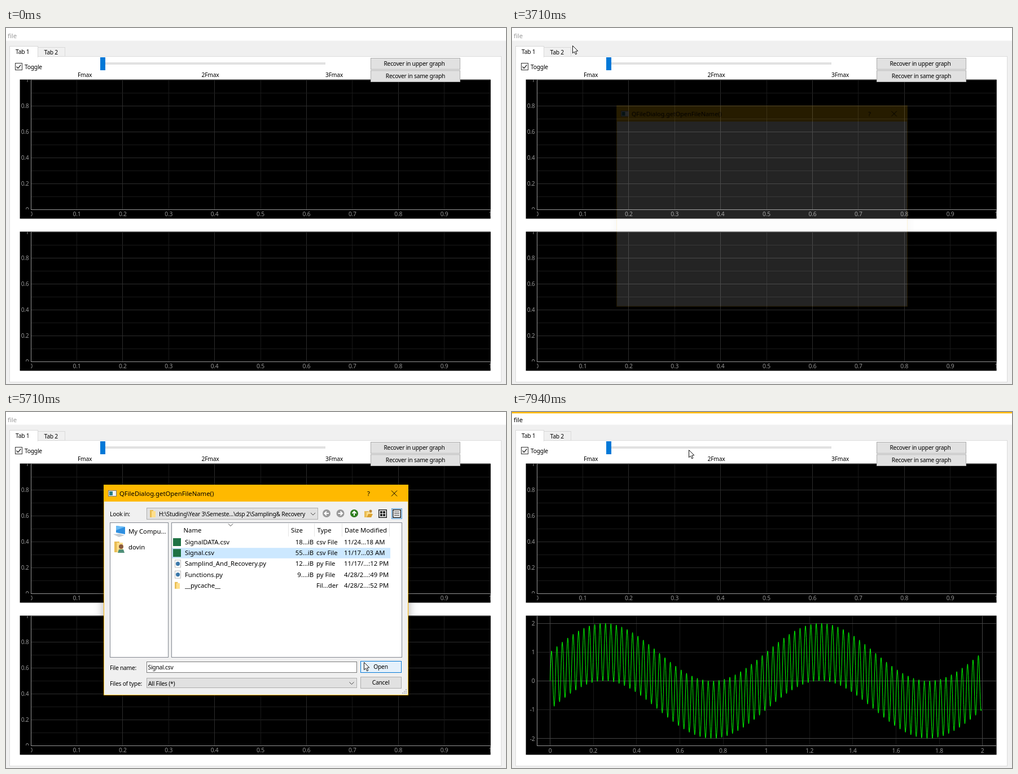
An HTML page with a canvas that plays this animation: 886x632 px, repeating every 8 s.

```html
<!DOCTYPE html>
<html lang="en">
<head>
<meta charset="utf-8">
<title>Sampling window</title>
<style>
html, body { margin: 0; width: 100%; height: 100%; overflow: hidden; background: #f0f0f0; }
canvas { display: block; }
</style>
</head>
<body>
<canvas id="stage" width="886" height="632"></canvas>
<script>
const W = 886, H = 632, LOOP = 8000, TICK = 77, START = 460;
const stage = document.getElementById('stage').getContext('2d');
const layer = document.createElement('canvas');
layer.width = W; layer.height = H;
const sheet = layer.getContext('2d');
let c = stage;

const BLUE = '#0078d7', AMBER = '#ffb900', BTN = '#e1e1e1', EDGE = '#adadad';
const SMALL = ['10.3px "Noto Sans", "Open Sans", sans-serif', '-0.24px'];
const UI = ['11.3px "Noto Sans", "Open Sans", sans-serif', '0px'];

const AT = {
  hover: 1380, menu: 1760, item: 2220, submenu: 2520, subitem: 3210, chosen: 3610,
  filled: 3760, picked: 4690, pressed: 5840, loaded: 6150, gone: 6380
};

// pointer strokes: begin, end, where to
const STROKES = [
  [460, 690, 85, 240], [770, 1070, 30, 59], [1070, 1460, 15, 2], [2000, 2300, 34, 32],
  [3080, 3610, 107, 31], [3850, 4230, 356, 215], [4290, 4690, 340, 247],
  [5020, 5690, 634, 444], [5840, 5930, 640.5, 449], [7100, 7560, 234, 34],
  [7560, 7700, 336, 52], [7860, 7920, 313, 67]
];

const clamp = v => Math.max(0, Math.min(1, v));
const ease = v => v * v * (3 - 2 * v);

// the screen only refreshes on regular ticks
const held = t => START + Math.floor((t - START) / TICK + .2) * TICK;

function pointerAt(t) {
  if (t < START || (t > 760 && t < 1070)) return null;
  let x = 654, y = 511;
  for (const [a, b, u, v] of STROKES) {
    const k = ease(clamp((t - a) / (b - a)));
    x += (u - x) * k;
    y += (v - y) * k;
  }
  return [x, y];
}

function rect(x, y, w, h, fill, edge) {
  if (fill) { c.fillStyle = fill; c.fillRect(x, y, w, h); }
  if (edge) { c.strokeStyle = edge; c.lineWidth = 1; c.strokeRect(x + .5, y + .5, w - 1, h - 1); }
}

function trace(points) {
  c.beginPath();
  for (let i = 0; i < points.length; i += 2) c.lineTo(points[i], points[i + 1]);
}

function line(points, color, width = 1) {
  trace(points);
  c.strokeStyle = color; c.lineWidth = width; c.stroke();
}

function poly(points, color) {
  trace(points);
  c.fillStyle = color; c.fill();
}

function disc(x, y, r, color) {
  c.beginPath(); c.arc(x, y, r, 0, 7); c.fillStyle = color; c.fill();
}

function text(s, x, y, font = SMALL, color = '#000', align = 'left') {
  c.font = font[0]; c.letterSpacing = font[1];
  c.textAlign = align; c.fillStyle = color;
  c.fillText(s, x, y);
}

function button(x, y, w, h, label, cx, fill = BTN, edge = EDGE, ink = '#000') {
  rect(x, y, w, h, fill, edge);
  text(label, cx, y + 14, SMALL, ink, 'center');
}

function clipped(x, y, w, h, draw) {
  c.save(); c.beginPath(); c.rect(x, y, w, h); c.clip(); draw(); c.restore();
}

const snap = v => Math.floor(v) + .5;
const vline = (x, top, color) => line([snap(x), top, snap(x), top + 230], color);
const hline = (y, color) => line([44, snap(y), 858, snap(y)], color);

function plot(top, signal) {
  const ink = '#969696', base = top + 230;
  rect(24.6, top - .5, 834, 247, '#000');
  if (signal) {
    const px = v => 67.6 + 383 * v, py = v => 477.3 - 51.1 * v;
    for (let i = 0; i <= 10; i++) {
      vline(px(i / 5), top, i % 10 == 0 ? '#444' : i == 5 ? '#2a2a2a' : '#191919');
      text(String(i / 5), px(i / 5), base + 12.5, SMALL, ink, 'center');
    }
    for (let v = -2; v <= 2; v++) {
      hline(py(v), v % 2 ? '#242424' : '#444');
      text(String(v), 40.5, py(v) + 4, SMALL, ink, 'right');
    }
    const wave = [];
    for (let s = 0; s <= 1.996; s += .00125)
      wave.push(px(s), py(Math.sin(2 * Math.PI * s) + Math.sin(80 * Math.PI * s)));
    line(wave, '#00ff00');
  } else {
    for (let i = 0; i <= 10; i++) {
      const x = 44 + 81.4 * i, y = base - 23 * i, tone = i % 2 ? '#191919' : '#2d2d2d';
      vline(x, top, tone);
      hline(y, tone);
      const label = String(i / 10);
      clipped(44, base, 815, 16, () => text(label, x, base + 12, SMALL, ink, 'center'));
      if (i % 2 == 0)
        clipped(25, top, 19, 230, () => text(label, 40.5, y + 4, SMALL, ink, 'right'));
    }
  }
  vline(44, top, ink);
  hline(base, ink);
}

function mainWindow(t, active) {
  rect(0, 0, W, H, '#f0f0f0');
  rect(0, 0, W, 22.5, '#fff');
  if (active) rect(0, 0, W, 2.4, AMBER);
  if (t >= AT.hover && t < AT.chosen) rect(0, 3, 26, 20, t < AT.menu ? '#e5f3ff' : '#cce8ff');
  text('file', 3, 17.5, UI, active ? '#000' : '#9a9a9a');

  rect(6, 50, 872, 579, '#fff', '#dcdcdc');
  rect(56, 34, 49, 17, '#f0f0f0', '#d9d9d9');
  rect(6, 32, 51, 20, '#fff', '#d9d9d9');
  rect(7, 50, 49, 3, '#fff');
  text('Tab 1', 17, 46);
  text('Tab 2', 67.5, 46.5);

  rect(16, 62, 13, 13, '#fff', '#333');
  line([18.5, 68.5, 21.3, 71.5, 26.3, 65.5], '#222', 1.2);
  text('Toggle', 33, 73);

  rect(167, 61, 399, 4, '#e1e1e1');
  rect(167, 52, 9, 23, BLUE);
  ['Fmax', '2Fmax', '3Fmax'].forEach((s, i) => text(s, 127 + 219.5 * i, 87));

  plot(92, false);
  plot(362, t >= AT.loaded);
  button(646, 53, 159, 21, 'Recover in upper graph', 723.5);
  button(646, 75, 159, 21, 'Recover in same graph', 725.5);
}

function popup(x, y, w, h, since, t, draw) {
  if (t < since || t >= AT.chosen) return;
  c.save();
  c.globalAlpha = clamp((t - since + 60) / 200);
  c.shadowColor = 'rgba(0,0,0,.45)'; c.shadowBlur = 4;
  c.shadowOffsetX = c.shadowOffsetY = 2;
  rect(x, y, w, h, '#f2f2f2');
  c.shadowColor = 'transparent';
  rect(x, y, w, h, null, '#ccc');
  draw();
  c.restore();
}

function menus(t) {
  popup(-1, 23, 84, 62, AT.menu, t, () => {
    if (t >= AT.item) rect(0, 25, 80, 19, '#91c9f7');
    ['open', 'save', 'exit'].forEach((s, i) => text(s, 26, 39 + 19 * i, UI));
    poly([67, 31, 67, 38, 71, 34.5], '#000');
  });
  popup(80, 25, 98, 23, AT.submenu, t, () => {
    if (t >= AT.subitem) rect(82, 27, 94, 19, '#91c9f7');
    text('open file', 108, 41, UI);
  });
}

function chevron(x, y) {
  line([x - 4, y - 2, x, y + 2, x + 4, y - 2], '#444');
}

function folder(x, y, w, h) {
  rect(x, y, w * .6, h, '#e9bd55');
  rect(x + w * .3, y + 2, w * .7, h - 2, '#ffdf8b');
}

function arrow(x, turn, color) {
  disc(x, 180, 7, color);
  c.save(); c.translate(x, 180); c.rotate(turn * Math.PI / 2);
  line([-4, 0, 3, 0], '#fff', 2);
  line([0, -3.5, 3.5, 0, 0, 3.5], '#fff', 2);
  c.restore();
}

function viewIcon(x) {
  rect(x, 173, 15, 15, '#222');
  rect(x + 1.5, 174.5, 12, 12, '#fff');
}

function toolbar(focus) {
  text('Look in:', 184, 185);
  rect(249, 170, 304, 21, focus ? '#deebf6' : BTN, focus ? '#4c95cf' : EDGE);
  folder(255, 174, 10, 13);
  text('H:\\Studing\\Year 3\\Semeste...\\dsp 2\\Sampling& Recovery', 271, 185);
  chevron(544, 181);
  arrow(568, 2, '#9a9a9a');
  arrow(592.5, 0, '#9a9a9a');
  arrow(617, -1, '#2f7d1f');
  folder(635, 176, 13, 11);
  poly([639, 187, 642, 181, 650, 181, 647, 187], '#d9a030');
  disc(646, 176, 2.5, '#b9873a');
  viewIcon(660);
  for (const x of [663, 668]) for (const y of [176, 181]) rect(x, y, 4, 4, '#222');
  rect(683, 171, 19, 19, '#cce4f7', '#5aa0d8');
  viewIcon(685);
  for (let i = 0; i < 3; i++) line([688, 177.5 + 3 * i, 697, 177.5 + 3 * i], '#222');
}

function sidebar() {
  rect(184, 196, 104, 240, '#fff', '#828790');
  poly([195, 202, 211, 204, 211, 217, 195, 214], '#2f8fe0');
  poly([195, 202, 211, 204, 195, 210], '#6bbcf5');
  poly([190, 217, 201, 216, 210, 219, 200, 222], '#c5ccd2');
  text('My Compu...', 217, 216, UI);
  folder(192, 230, 15, 19);
  disc(204, 239, 4, '#8a5a3c');
  poly([198, 250, 200, 244, 208, 244, 210, 250], '#4f8f78');
  text('dovin', 217, 243.5, UI);
}

const FILES = [
  ['SignalDATA.csv', '18...iB', 'csv File', '11/24...18 AM'],
  ['Signal.csv', '55...iB', 'csv File', '11/17...03 AM'],
  ['Samplind_And_Recovery.py', '12...iB', 'py File', '11/17/...:12 PM'],
  ['Functions.py', '9....iB', 'py File', '4/28/2...:49 PM'],
  ['__pycache__', '', 'Fil...der', '4/28/2...:52 PM']
];

function fileList(t, picked, [mx, my]) {
  rect(293, 196, 409, 240, '#fff', '#828790');
  const inList = mx > 294 && mx < 681;
  if (inList && mx < 501 && my > 197 && my < 221) rect(294, 197, 207, 24, '#d9ebf9');
  for (const x of [501, 547, 596, 680]) line([x - .5, 198, x - .5, 221], '#e5e5e5');
  chevron(398, 200.5);
  text('Name', 314.5, 214, UI);
  text('Size', 505, 214, UI);
  text('Type', 551.5, 214, UI);
  text('Date Modified', 600, 214, UI);
  FILES.forEach(([name, size, type, date], i) => {
    const y = 231 + 19.2 * i;
    const hover = inList && Math.floor((my - 221.4) / 19.2) == i;
    const chosen = t >= AT.loaded ? '#d9d9d9' : '#cce8ff';
    if (picked && i == 1) rect(294, y - 9, 387, 18.6, chosen);
    else if (hover) rect(294, y - 9, 387, 18.6, '#e5f3ff');
    if (name.endsWith('csv')) rect(296, y - 7, 14, 14, '#1f7244');
    else if (name.endsWith('py')) {
      rect(299, y - 7, 11, 14, '#fff', '#bbb');
      disc(304.5, y, 3.6, '#3c78aa');
    } else folder(299, y - 6, 9, 12);
    text(name, 317, y + 4, UI);
    text(size, 545, y + 4, UI, '#000', 'right');
    text(type, 550, y + 4, UI);
    text(date, 599, y + 4, UI);
  });
}

function dialogBody(t, pos) {
  const picked = t >= AT.picked;
  toolbar(!picked);
  sidebar();
  fileList(t, picked, pos);
  text('File name:', 184, 457.5);
  rect(249, 443, 373, 20, '#fff', picked ? '#7a7a7a' : BLUE);
  if (picked) text('Signal.csv', 251.5, 457);
  text('Files of type:', 184, 485.5);
  rect(249, 472, 373, 18, BTN, EDGE);
  text('All Files (*)', 252, 485.5);
  chevron(612.5, 481.5);
  const over = pos[0] > 628 && pos[1] > 442;
  if (!picked) button(628, 442, 73, 21, 'Open', 664, '#ccc', '#bfbfbf', '#838383');
  else button(628, 442, 73, 21, 'Open', 664, t >= AT.pressed ? '#cce4f7' : over ? '#e5f1fb' : BTN, BLUE);
  button(628, 470, 73, 21, 'Cancel', 664);
  for (let i = 0; i < 3; i++) for (let j = 0; j <= i; j++)
    rect(702 + 3 * i, 498 - 3 * j, 2, 2, '#bbb');
}

function dialog(t, pos) {
  if (t < 3690 || t >= AT.gone) return;
  const closing = t >= AT.loaded, u = clamp((t - 3660) / 300);
  const alpha = closing ? clamp(1 - (t - 6135) / 213) : clamp(1.3 * u);
  const scale = closing ? 1 - .043 * (1 - alpha) : 1 - .057 * (1 - u) ** 2;

  c = sheet;
  c.clearRect(0, 0, W, H);
  rect(173, 129, 540, 374, '#f0f0f0', AMBER);
  rect(173, 129, 540, 30, AMBER);
  rect(181, 139, 15, 11, '#f4f4f4', '#777');
  rect(183, 141, 6, 7, '#2c7f86');
  text('QFileDialog.getOpenFileName()', 201, 149, UI);
  if (!closing) {
    text('?', 642.5, 149, UI, '#000', 'center');
    line([683, 139.5, 693, 149.5], '#000');
    line([693, 139.5, 683, 149.5], '#000');
  }
  if (t >= AT.filled) dialogBody(t, pos);

  c = stage;
  c.save();
  c.globalAlpha = alpha;
  c.translate(443, 316); c.scale(scale, scale); c.translate(-443, -316);
  // the shadow stays outside the translucent body
  c.save();
  c.beginPath();
  c.rect(-50, -50, W + 100, H + 100);
  c.rect(173, 129, 540, 374);
  c.clip('evenodd');
  c.shadowColor = 'rgba(0,0,0,.34)'; c.shadowBlur = 16; c.shadowOffsetY = 4;
  rect(173, 129, 540, 374, '#000');
  c.restore();
  c.drawImage(layer, 0, 0);
  c.restore();
}

function pointer([x, y]) {
  c.save();
  c.translate(x + .5, y + .5);
  c.lineJoin = 'round';
  const shape = [0, 0, 0, 13.2, 3, 10.5, 5.2, 15.3, 7.3, 14.3, 5.2, 9.7, 9.3, 9.3, 0, 0];
  poly(shape, '#fff');
  line(shape, '#111');
  c.restore();
}

function frame(now) {
  const t = held(now % LOOP), pos = pointerAt(t);
  mainWindow(t, (t >= AT.menu && t < AT.chosen) || t >= AT.loaded);
  menus(t);
  dialog(t, pos || [0, 0]);
  if (pos) pointer(pos);
}

const begin = performance.now();
function tick() {
  frame(performance.now() - begin);
  requestAnimationFrame(tick);
}
tick();
</script>
</body>
</html>
```
